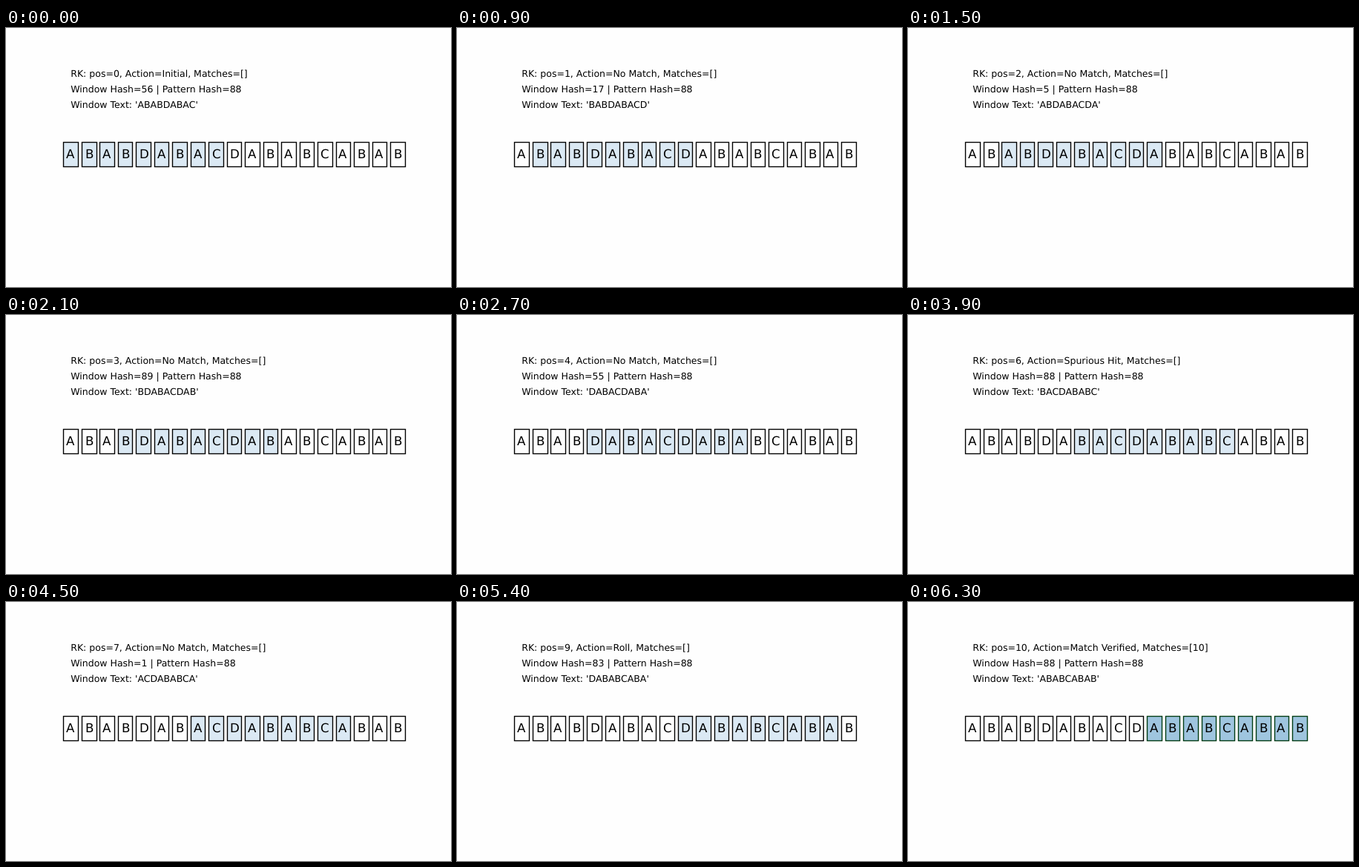
An HTML page for the animation above (6.6 s loop, 600 px wide and 350 px high).

```html
<!DOCTYPE html>
<html lang="en">
<head>
<meta charset="utf-8">
<title>Rabin-Karp string search</title>
<style>
  html, body { margin: 0; width: 100%; height: 100%; overflow: hidden; background: #fefefe; }
  svg { display: block; width: 600px; height: 350px; }
  text { font-family: "DejaVu Sans", sans-serif; fill: #000; white-space: pre; text-rendering: geometricPrecision; }
  .info { font-size: 12.53px; }
  .char { font-size: 16.67px; }
  rect { fill: #fefefe; stroke: #000; stroke-width: 1.39; }
  rect.window { fill: #dbe9f4; }
  rect.match { fill: #9fc5df; stroke: #003c14; }
</style>
</head>
<body>
<svg viewBox="0 0 600 350">
  <text class="info" x="87.2" y="66"></text>
  <text class="info" x="87.2" y="87"></text>
  <text class="info" x="87.2" y="108"></text>
  <g id="cells"></g>
</svg>
<script>
const TEXT = 'ABABDABACDABABCABAB';
const PATTERN = 'ABABCABAB';
const STEP = 300;
const LEFT = 75, PITCH = 465 / TEXT.length;

const hash = s => [...s].reduce((h, c) => (h * 256 + c.charCodeAt(0)) % 101, 0);
const lines = document.querySelectorAll('.info');
const cells = document.getElementById('cells');
const pen = document.createElement('canvas').getContext('2d');
pen.font = '16.67px "DejaVu Sans", sans-serif';

function add(name, attrs) {
  const node = document.createElementNS('http://www.w3.org/2000/svg', name);
  for (const key in attrs) node.setAttribute(key, attrs[key]);
  return cells.appendChild(node);
}

// Starts a letter half its ink width left of the centre, ink on a whole pixel.
function letterX(c, center) {
  const { actualBoundingBoxLeft: l, actualBoundingBoxRight: r } = pen.measureText(c);
  return Math.round(center - (l + r) / 2 - l) + l;
}

const boxes = [...TEXT].map((c, i) => {
  const edge = part => Math.round(LEFT + (i + part) * PITCH) + 0.5;
  const x = edge(0.1);
  const box = add('rect', { x, y: 154.5, width: edge(0.9) - x, height: 33 });
  const letter = add('text', { class: 'char', x: letterX(c, LEFT + (i + 0.5) * PITCH), y: 176 });
  letter.textContent = c;
  return box;
});

// Each position takes two steps: the window rolls in, then it is checked.
const steps = [];
for (let pos = 0; pos + PATTERN.length <= TEXT.length; pos++) {
  const part = TEXT.slice(pos, pos + PATTERN.length);
  const found = part === PATTERN;
  const hit = hash(part) === hash(PATTERN);
  const result = found ? 'Match Verified' : hit ? 'Spurious Hit' : 'No Match';
  steps.push({ pos, part, action: pos ? 'Roll' : 'Initial', found: false });
  steps.push({ pos, part, action: result, found });
}

function show({ pos, part, action, found }) {
  lines[0].textContent = `RK: pos=${pos}, Action=${action}, Matches=[${found ? pos : ''}]`;
  lines[1].textContent = `Window Hash=${hash(part)} | Pattern Hash=${hash(PATTERN)}`;
  lines[2].textContent = `Window Text: '${part}'`;
  boxes.forEach((box, i) => {
    const inside = i >= pos && i < pos + PATTERN.length;
    box.setAttribute('class', inside ? (found ? 'match' : 'window') : '');
  });
}

let current = -1;
const start = performance.now();
function draw() {
  const index = Math.floor((performance.now() - start) / STEP) % steps.length;
  if (index !== current) show(steps[current = index]);
  requestAnimationFrame(draw);
}
draw();
</script>
</body>
</html>
```
